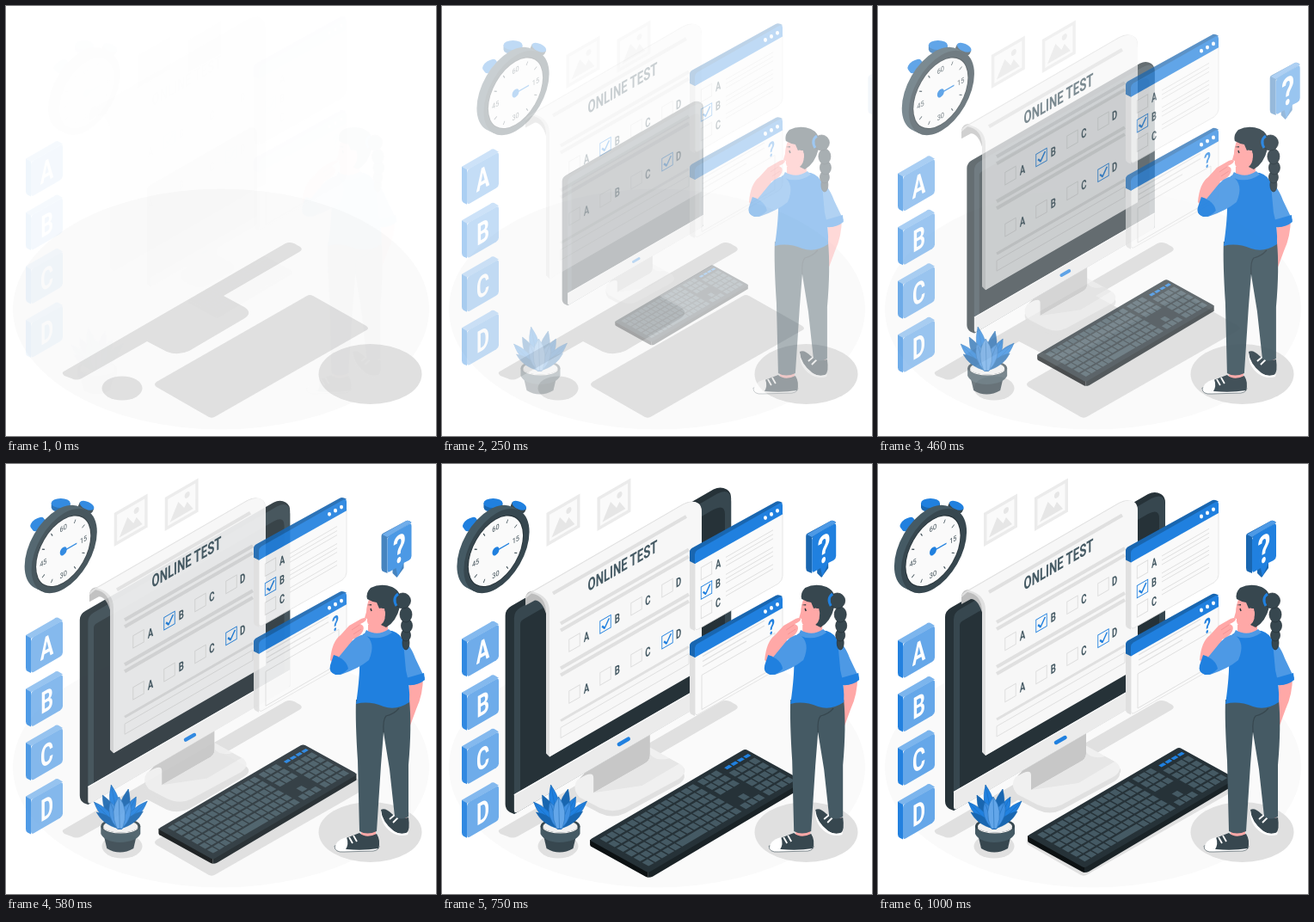
An HTML page that plays this animation: 500x500 px, repeating every 1040 ms.

```html
<!DOCTYPE html>
<html lang="en">
<head>
<meta charset="utf-8">
<title>Online test</title>
<style>
  html, body { margin: 0; width: 100%; height: 100%; overflow: hidden; background: #fff; }
  svg { display: block; width: 100vw; height: 100vh; }
  text { font-family: Roboto, "Liberation Sans", sans-serif; font-weight: 700; text-anchor: middle; }
</style>
</head>
<body>
<svg id="stage" viewBox="0 0 500 500" xmlns="http://www.w3.org/2000/svg"></svg>
<script>
const BLUE = '#2080df', SKY = '#63a6e9', NAVY = '#1966b0';
const INK = '#263238', SLATE = '#37474f', STEEL = '#455a64', SKIN = '#ffa8a7';
const SLOPE = Math.tan(Math.PI / 6);

const path = (d, fill, extra = '') => `<path d="${d}" fill="${fill}" ${extra}/>`;
const stroke = (d, color, width = 1, extra = '') =>
  path(d, 'none', `stroke="${color}" stroke-width="${width}" stroke-linejoin="round" ${extra}`);
const oval = (x, y, rx, ry, fill, extra = '') =>
  `<ellipse cx="${x}" cy="${y}" rx="${rx}" ry="${ry}" fill="${fill}" ${extra}/>`;
// Wall plane: x runs up to the right, y stays vertical.
const wall = (x, y, body) => `<g transform="matrix(.866 -.5 0 1 ${x} ${y})">${body}</g>`;
const label = (x, y, size, fill, text) =>
  `<text transform="matrix(.66 -.38 0 1 ${x} ${y})" y="${size * .355}" font-size="${size}" fill="${fill}">${text}</text>`;
const rule = (x1, y1, x2, width = 1, color = '#e0e0e0') =>
  stroke(`M${x1} ${y1}L${x2} ${y1 - (x2 - x1) * SLOPE}`, color, width);
const panel = (x1, y1, x2, h) => {
  const y2 = y1 - (x2 - x1) * SLOPE;
  return `M${x1} ${y1}L${x2} ${y2}V${y2 + h}L${x1} ${y1 + h}Z`;
};
const checkbox = (x, y, on) => wall(x, y,
  `<rect x="-7.2" y="-7.2" width="14.4" height="14.4" fill="none" stroke="${on ? BLUE : '#dcdcdc'}"/>` +
  (on ? stroke('M-4.5 0L-1 4L5 -4.5', BLUE, 2) : ''));

function floor() {
  const grey = '#e0e0e0';
  return oval(250, 352.5, 242, 140, '#fafafa') +
    path('M67 425L325 276Q329 274 335 276L342 280Q346 283 341 286L253 337L277 350Q288 357 276 364L213 401Q200 407 187 402L164 390L88 433Q82 436 76 433L68 430Q64 427 67 425Z', grey) +
    path('M350 337Q353 335 357 337L419 372Q423 375 419 377L244 477Q240 480 236 478L175 443Q171 440 175 437Z', grey) +
    oval(423.5, 428, 60, 35, grey) + oval(135, 444.5, 23.5, 14, grey);
}

function stopwatch() {
  let dial = `<circle r="37.5" fill="${INK}"/><circle r="36.5" fill="#fafafa"/>`;
  for (let i = 0; i < 12; i++) {
    if (i % 3) dial += `<path d="M0 -33V-29" stroke="${SLATE}" transform="rotate(${i * 30})"/>`;
  }
  ['60', '15', '30', '45'].forEach((mark, i) => {
    const a = i * Math.PI / 2;
    dial += `<text x="${27 * Math.sin(a)}" y="${-27 * Math.cos(a) + 3}" font-size="8.5" style="font-weight:400" fill="${SLATE}">${mark}</text>`;
  });
  dial += stroke('M0 0H18', BLUE, 1.5) + `<circle r="4.6" fill="${BLUE}"/>`;
  const cap = (x, y, s, turn, side) => `<g transform="translate(${x} ${y}) rotate(${turn}) scale(${s})">` +
    path('M-5 4V14H5V4Z', INK) + path('M-11 -1V4A11 5.5 0 0 0 11 4V-1Z', side) + oval(0, -1, 11, 5.5, BLUE) + '</g>';
  const disc = (x, y, fill) => wall(x, y, `<circle r="44" fill="${fill}"/>`);
  return cap(61, 46.5, 1, 0, NAVY) + cap(34, 69, .84, -35, BLUE) + cap(91, 49, .82, 25, SLATE) +
    disc(57, 97, STEEL) + disc(61, 99, STEEL) + disc(65, 101, SLATE) + wall(64, 101.3, dial);
}

function pictures() {
  return [[123, 57], [182, 39]].map(([x, y]) => wall(x, y,
    '<rect width="45" height="39" fill="#ebebeb"/><rect x="4" y="4" width="37" height="31" fill="#fafafa"/>' +
    path('M7 32L18 14L26 25L30 20L38 32Z', '#e6e6e6') + '<circle cx="30" cy="12" r="3.5" fill="#e6e6e6"/>')).join('');
}

function monitor() {
  const base = 'M160 364L232 322L277 347Q286 355 275 363L214 396Q200 403 185 396L162 384Q153 374 160 364Z';
  return `<g transform="translate(0 6)">${path(base, '#e0e0e0')}</g>` + path(base, '#f0f0f0') +
    path('M176 340L242 302V337Q242 343 234 347L178 379V362Q178 353 162 363Q172 354 176 340Z', '#c7c7c7') +
    path('M242 302V335Q249 344 264 340L275 346L233 371L178 379L234 347Q242 343 242 337Z', '#e6e6e6') +
    path('M88 403L83 401Q78 398 78 392V178Q78 171 85 167L314 35Q322 31 329 35Q334 38 334 45V258Z', INK) +
    path('M88 403V181Q88 173 95 169L318 40Q334 32 334 49V259Z', SLATE) +
    path('M95 377V188Q95 184 99 182L314 58Q327 51 327 63V243Z', INK) +
    path('M88 381L334 239V256Q334 260 330 262L93 400.500Q88 403 88 399Z', '#ebebeb') +
    rule(88, 381.5, 334, 1.2, '#fafafa') +
    stroke('M207 324L217.5 318', BLUE, 4.5, 'stroke-linecap="round"');
}

function sheet() {
  let out = path('M97 163V153Q99 145 108 146L128 154L122 176Q117 157 108 157Z', '#bdbdbd') +
    path('M121 335V172Q121 152 104 149L97 155Q97 151 102 148L280 45Q291 39 299 45Q302 48 302 54V233L125 339Z', '#e0e0e0') +
    path('M125 339V170Q125 152 106 147L281 45.5Q302 36 302 57V237Z', '#f7f7f7');
  out += rule(129, 149, 284, 4) + label(210, 116.5, 20, STEEL, 'ONLINE TEST');
  for (const [y, w] of [[184, 4], [192, 4], [236, 4], [244, 4], [297, 3]]) out += rule(138, y, 287, w);
  out += stroke(panel(138, 305, 287, 12), '#e0e0e0');
  [206, 266].forEach((y, row) => [...'ABCD'].forEach((letter, i) => {
    const drop = i * 36 * .587;
    out += checkbox(154 + i * 36, y - drop, row ? i === 3 : i === 1) +
      label(168 + i * 35.7, y - 7 - drop, 14.5, STEEL, letter);
  }));
  return out;
}

function frame(top, bodyHeight) {
  const y = top + 58, foot = y + 15 + bodyHeight, right = foot - 102 * SLOPE;
  let out = path(`M288 ${y + 10}L294 ${y + 12}V${foot}L290 ${foot - 2}Q288 ${foot - 3} 288 ${foot - 6}Z`, '#e0e0e0') +
    path(`M294 ${y + 12}L396 ${top + 14}V${right - 5}Q396 ${right} 391 ${right + 4}L298 ${foot - 2}Q294 ${foot} 294 ${foot - 5}Z`, '#fafafa', 'stroke="#e0e0e0" stroke-width=".8"') +
    path(`M288 ${y + 12}V${y + 1}Q288 ${y - 2} 292 ${y - 4}L388 ${top + 1}Q391 ${top - 1} 396 ${top + 2}L294 ${y + 15}Z`, NAVY) +
    path(`M294 ${y + 15}V${y + 4}Q294 ${y + 1} 297 ${y - 1}L392 ${top + 3}Q396 ${top + 1} 396 ${top + 5}V${top + 15.5}Z`, BLUE);
  for (const i of [0, 1, 2]) out += oval(376 + i * 7, top + 19.5 - i * 4.1, 2, 2.4, '#fff');
  return out;
}

function windows() {
  let out = frame(41.5, 78);
  [...'ABC'].forEach((letter, i) => {
    out += checkbox(307.5, 122.5 + i * 22.5, i === 1) + label(321, 114.5 + i * 22.5, 14, STEEL, letter);
  });
  for (const y of [107, 112, 117, 127, 132, 137, 147, 152]) out += rule(330, y, 385);
  out += frame(150.5, 68);
  for (const [y, end] of [[222, 375], [228, 375], [234, 354]]) out += rule(303, y, end, 1.2);
  return out + stroke(panel(302, 244, 387, 40), '#e0e0e0') + label(383, 188, 24, BLUE, '?');
}

function keyboard() {
  const at = (u, v) => `${(176 + 174 * u + 64 * v).toFixed(1)} ${(432 - 102 * u + 36 * v).toFixed(1)}`;
  const tile = (u, v, w, h, fill) =>
    path(`M${at(u, v)}L${at(u + w, v)}L${at(u + w, v + h)}L${at(u, v + h)}Z`, fill);
  let out = path('M240 467V475Q243 475 245 474L415 373V365Z', '#1a2327') +
    path('M174 432V438Q174 440 177 441L237 474Q239 475 240 475V466Z', '#0c1113') +
    path('M176 431L347 331Q350 329 353 331L413 364Q416 366 413 368L243 468Q240 470 237 468L176 434Q173 433 176 431Z', INK);
  for (let row = 0; row < 6; row++) {
    const v = .06 + row * .15;
    for (let i = 0; i < 14; i++) {
      if (row === 5 && i > 4 && i < 9) continue;
      out += tile(.03 + i * .044, v, .036, .115, STEEL);
    }
    if (row === 5) out += tile(.03 + 5 * .044, v, .168, .115, STEEL);
    for (let i = 0; i < 3; i++) {
      if (row < 3 || row === 5 || row === 4 && i === 1) out += tile(.665 + i * .044, v, .036, .115, STEEL);
    }
    for (let i = 0; i < 4; i++) {
      out += row ? tile(.815 + i * .044, v, .036, .115, STEEL) : tile(.83 + i * .041, .09, .032, .055, BLUE);
    }
  }
  return out;
}

function plant() {
  const leaf = (x, y, w, fill) => {
    const dx = 135 - x, dy = 424 - y, len = Math.hypot(dx, dy), nx = dy / len * w, ny = -dx / len * w;
    const mx = x + dx * .42, my = y + dy * .42;
    return path(`M${x} ${y}Q${mx + nx * 1.5} ${my + ny * 1.5} ${135 + nx * .4} 424H${135 - nx * .4}Q${mx - nx * 1.5} ${my - ny * 1.5} ${x} ${y}Z`, fill,
      `stroke="${NAVY}" stroke-width=".5"`) + stroke(`M${x} ${y}L135 424`, NAVY, .5);
  };
  const leaves = [[125, 373, 7, BLUE], [145, 378, 7, NAVY], [115, 385, 7, NAVY], [154, 387, 7, BLUE],
    [105, 393, 6, BLUE], [167, 392, 6, BLUE], [108, 405, 5, NAVY], [162, 404, 5, NAVY],
    [124, 393, 7, '#4090e2'], [147, 393, 7, '#4090e2'], [134, 387, 8, SKY]];
  return path('M116 430L120 447Q135 456 151 447L155 430Z', SLATE) +
    path('M113 421V430Q117 439 135 440Q155 439 159 430V421Z', STEEL) +
    oval(136, 421, 23, 9, SLATE) + oval(136, 421.5, 20, 7, '#f0f0f0') +
    leaves.map(l => leaf(...l)).join('') +
    path('M116 421.5A20 7 0 0 0 156 421.5V424A21 8 0 0 1 116 424Z', '#f0f0f0');
}

function blocks() {
  return [...'ABCD'].map((letter, i) => `<g transform="translate(0 ${i * 62.5})">` +
    path('M23 205L56 186Q59 183.500 62 185.500L66 188L29 209Z', '#7ab4ed') +
    path('M23 205L29 208.500V249L25 247Q23 246 23 243Z', BLUE) +
    path('M29 212Q29 209 32 207L63 189.500Q66 188 66 191V225Q66 228 63 230L32 248Q29 249.500 29 246Z', SKY) +
    label(47.5, 218.5, 35, '#fff', letter) + '</g>').join('');
}

function person() {
  const sole = 'M379 444Q379 452 390 451L424 450Q431 449 431 444Z';
  let out = path('M466 250L482 247Q482 268 474 285L467 304Q463 300 464 285Z', SKIN) +
    path('M449 405H463V417H449Z', SKIN) + path('M410 420H427V437H410Z', SKIN) +
    // shoes
    path('M433 402Q438 399 446 407Q453 414 465 411Q467 425 463 429Q455 432 447 426Q434 416 433 402Z', SLATE) +
    path('M433 403Q434 416 448 427Q456 432 465 428L464 431Q454 434 445 428Q432 419 433 403Z', '#fff') +
    stroke('M443 413L449 408M447 417L453 411', '#fff', 1.8) +
    path(sole, '#fff', 'stroke="#37474f" stroke-width=".6"') +
    path('M380 445Q382 438 395 434L408 429Q416 436 428 430Q433 438 430 447Q412 450 393 448Z', SLATE) +
    path('M380 447Q379 438 393 434Q396 442 392 448Z', '#fff') +
    stroke('M396 434L400 441M401 432L405 439', '#fff', 1.8) +
    // legs
    path('M404 274Q403 300 406 345L408 427Q417 432 428 427L433 350L436 312L443 355L449 410Q457 415 465 410L465 350Q469 305 466 274Z', STEEL) +
    stroke('M436 312Q435 297 439 293Q448 291 454 284', SLATE, 1.2);
  // torso and far sleeve
  out += path('M449 197Q466 206 473 226L484 249Q476 258 464 257L454 232Z', '#4d99e5') +
    path('M462 249L483 243L484 251Q476 258 464 257Z', BLUE) +
    path('M412 198Q423 192 431 193L446 194Q456 197 459 207L462 240Q467 258 466 277Q451 287 436 282Q419 275 404 279Q409 245 408 225Z', BLUE) +
    path('M418 187L441 184L441 195Q429 201 418 195Z', SKIN) +
    path('M416 193Q429 201 442 192L446 196Q430 207 413 199Z', '#4d99e5');
  // arm raised to the chin
  out += path('M374 228Q376 206 386 199L396 188L410 180Q415 178 416 180Q416 183 409 186L412 188Q414 191 411 196Q408 201 400 204L395 225L383 237Z', SKIN) +
    stroke('M399 193L408 187M401 198L410 192', '#f28f8f', .8) +
    path('M414 198Q404 199 395 211L386 222L374 236Q373 245 386 245Q407 238 419 228Q428 207 414 198Z', '#4d99e5') +
    path('M378 222Q393 227 395 238Q388 246 380 245Q372 242 374 234Z', BLUE);
  // head and hair
  out += path('M420 155Q416 165 416 172L414 179L417 180Q416 187 422 188Q432 190 438 183L443 160L432 151Z', SKIN) +
    path('M417 157Q415 150 421 144Q433 138 446 143Q459 149 455 166Q451 183 439 190L433 187Q440 182 437 168H431L428 161Q422 160 417 157Z', SLATE) +
    oval(433, 174, 5, 6.5, SKIN) + stroke('M421 168L422 171', INK, 1.5) +
    path('M417 164L422 163V164.500Z', INK);
  for (const [x, y, rx, ry] of [[462, 208, 4, 8], [462, 199, 5.5, 7], [463, 188, 6.5, 8], [462, 175, 7, 9], [458.5, 159, 9, 9]]) {
    out += oval(x, y, rx, ry, SLATE, `stroke="${INK}" stroke-width=".7"`);
  }
  return out + stroke('M453 151Q446 156 451 165', BLUE, 3);
}

function bubble() {
  return path('M441 119V127L446 132L454 121V112Z', NAVY) +
    path('M428 84Q428 81 431 80L457 66Q460 65 463 68L435 86V127L430 125Q428 124 428 121Z', NAVY) +
    path('M429 82L457 66Q460 65 463 68L435 85Z', '#4d99e5') +
    path('M435 88Q435 85 438 83L460 70Q463 68 463 72V107Q463 110 460 112L454 115L447 131L445 121L438 125Q435 127 435 123Z', BLUE) +
    label(449, 98.500, 45, '#fff', '?');
}

const parts = { pictures, stopwatch, monitor, sheet, windows, keyboard, plant, blocks, person, bubble };
const stage = document.getElementById('stage');
stage.innerHTML = floor() + Object.entries(parts).map(([id, draw]) => `<g id="${id}">${draw()}</g>`).join('');
const nodes = Object.fromEntries(Object.keys(parts).map(id => [id, document.getElementById(id)]));

// Overshooting cubic curve through (.36, -.01) and (.5, 1.38).
function overshoot(t) {
  const curve = (s, a, b) => 3 * (1 - s) ** 2 * s * a + 3 * (1 - s) * s * s * b + s ** 3;
  let lo = 0, hi = 1;
  for (let i = 0; i < 24; i++) {
    const mid = (lo + hi) / 2;
    if (curve(mid, .36, .5) < t) lo = mid; else hi = mid;
  }
  return curve(lo, -.01, 1.38);
}

function track(points, t) {
  const i = Math.max(1, points.findIndex(p => p[0] >= t));
  const [t0, a] = points[i - 1], [t1, b] = points[i];
  return a + (b - a) * (t - t0) / (t1 - t0);
}

const STRIDE = [[0, .01], [6, .43], [9, .77], [11, .93], [14, 1.1], [18, 1.04], [24, 1]];
const BUBBLE_FADE = [[0, 0], [6, .05], [9, .22], [11, .45], [14, .8], [18, 1], [24, 1]];

function place(id, transform, opacity) {
  nodes[id].setAttribute('transform', transform);
  nodes[id].setAttribute('opacity', Math.max(0, Math.min(1, opacity)));
}

function render(ms) {
  const step = Math.min(24, Math.floor((ms % 1040 + 5) * 24 / 1000));
  const p = overshoot((step + 1) / 25), rest = 30 * (1 - p);
  const zoom = `translate(250 250) scale(${.5 + .5 * p}) translate(-250 -250)`;
  for (const id of ['monitor', 'keyboard']) place(id, zoom, p);
  for (const id of ['stopwatch', 'pictures']) place(id, `translate(${rest} 0)`, p);
  for (const id of ['sheet', 'windows']) place(id, `translate(0 ${-rest})`, p);
  place('plant', `translate(${-rest} 0)`, p);

  const u = step / 24, fall = 32 * u + 25.5 * u * u - 30 * u ** 3;
  place('blocks', `translate(0 ${fall - 27.5})`, (fall + 2) / 30);

  const stride = track(STRIDE, step);
  place('person', `translate(${-30 * (1 - stride)} 0)`, stride);
  place('bubble', `translate(${94 * (1 - p)} 0)`, track(BUBBLE_FADE, step));
}

const start = performance.now();
function tick() {
  render(performance.now() - start);
  requestAnimationFrame(tick);
}
tick();
</script>
</body>
</html>
```
